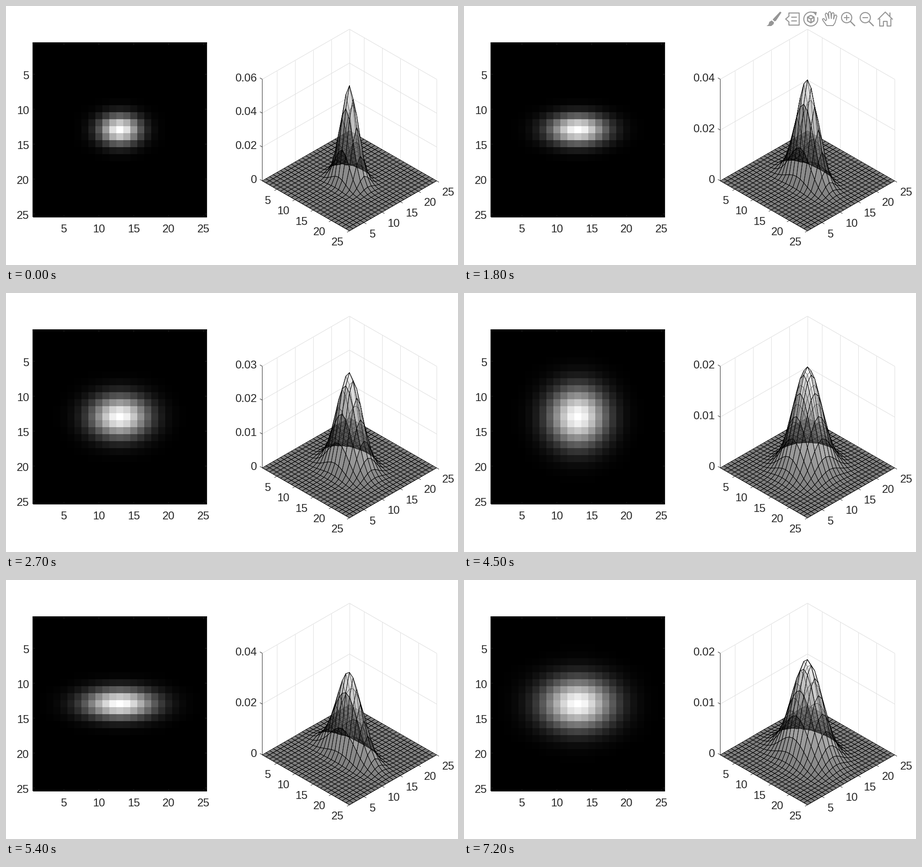
Animation of 971 by 556 pixels, one loop 8 s. Source, as a matplotlib script:

```python
import numpy as np
import matplotlib.pyplot as plt
from matplotlib.animation import FuncAnimation
from matplotlib.collections import LineCollection, PolyCollection
from matplotlib.patches import Arc, Circle, Polygon, Rectangle

W, H, DPI = 971, 556, 64
PT = 72 / DPI                      # points per pixel
INK, ICON = "#262626", "#969696"
N = 25
TICKS = range(5, 26, 5)
FRAME_MS, HOLD = 100, 9            # each plot is held for 9 frames

# Horizontal and vertical variance of each plot
STATES = [(vx, vy) for vx in (4, 8, 12) for vy in range(2, vx + 1, 2)][:9]

# Image panel
LEFT, TOP, CELL = 57.0, 79.0, 14.97
SIDE = N * CELL

# Surface panel
X0, Y0, DX, DY, RISE = 550.5, 375.3, 187.3 / 24, 107.4 / 24, 218.0

fig = plt.figure(figsize=(W / DPI, H / DPI), dpi=DPI, facecolor="white")
ax = fig.add_axes([0, 0, 1, 1])


def label(x, y, text, ha):
    return ax.text(x, y + 8.5, text, ha=ha, va="baseline", color=INK,
                   family="Liberation Sans", fontsize=24 * PT)


def line(points, color=INK, width=1.0, z=5):
    xs, ys = zip(*points)
    return ax.plot(xs, ys, color=color, lw=width * PT, zorder=z,
                   solid_joinstyle="round", solid_capstyle="butt")[0]


def project(a, b, h=0.0):
    """Screen position of column a, row b at height h (0..1)."""
    return (X0 + DX * (a + b - 2), Y0 + DY * (a - b) - RISE * h)


def gaussian(vx, vy):
    d = np.arange(N) - N // 2
    z = np.exp(-d[None, :] ** 2 / (2 * vx) - d[:, None] ** 2 / (2 * vy))
    return z, 1 / (2 * np.pi * np.sqrt(vx * vy))


def z_axis(peak):
    step = 0.02 if peak > 0.03 else 0.01
    top = np.ceil(peak / (step / 2)) * step / 2
    return top, np.arange(0, top + 1e-9, step)


# Image panel
image = ax.imshow(np.zeros((N, N)), cmap="gray", vmin=0, vmax=1,
                  extent=(LEFT, LEFT + SIDE, TOP + SIDE, TOP),
                  interpolation="nearest", aspect="auto", zorder=1)
ax.set(xlim=(0, W), ylim=(H, 0))
ax.axis("off")
ax.set_autoscale_on(False)
ax.add_patch(Rectangle((LEFT + 0.5, TOP + 0.5), SIDE - 0.5, SIDE - 0.5, fill=False,
                       ec=INK, lw=PT, zorder=2))
for t in TICKS:
    p = (t - 0.5) * CELL
    x, y = LEFT + p, TOP + p
    for edge, inward in ((TOP, 4), (TOP + SIDE, -4)):
        line([(x, edge), (x, edge + inward)])
    for edge, inward in ((LEFT, 4), (LEFT + SIDE, -4)):
        line([(edge, y), (edge + inward, y)])
    label(x, 478, t, "center")
    label(50, y + 2.3, t, "right")

# Surface panel: fixed axes
for t in TICKS:
    x, y = project(t, 1)
    line([(x, y), (x - 5, y + 3)])
    label(x - 12, y + 23.3, t, "right")
    x, y = project(N, t)
    line([(x, y), (x + 5, y + 3)])
    label(x + 11.5, y + 23.3, t, "left")
line([project(1, 1, 1), project(1, 1), project(N, 1), project(N, N)], z=2)

walls = [[project(1, t), project(1, t, 1)] for t in TICKS]
walls += [[project(t, N), project(t, N, 1)] for t in TICKS]
grid = LineCollection([], colors="#dedede", linewidths=PT, zorder=1)
z_marks = LineCollection([], colors=INK, linewidths=PT, zorder=5)
surface = PolyCollection([], edgecolors="black", linewidths=0.85 * PT, zorder=4)
for item in (grid, z_marks, surface):
    ax.add_collection(item, autolim=False)
z_labels = [label(539, 0, "", "right") for _ in range(4)]

# Faces from back to front
rows, cols = np.divmod(np.arange((N - 1) ** 2), N - 1)
order = np.argsort(cols - rows, kind="stable")
rows, cols = rows[order], cols[order]


def toolbar():
    parts = []

    def stroke(*points, width=2.2):
        parts.append(line(points, ICON, width))

    def patch(p):
        parts.append(ax.add_patch(p))

    def shape(*points):
        patch(Polygon(points, fc=ICON, ec="none", zorder=5))

    def ring(x, y, r):
        patch(Circle((x, y), r, fill=False, ec=ICON, lw=2.2 * PT, zorder=5))

    # Brush
    shape((679, 12), (682, 14), (670, 32), (667, 33), (663, 29))
    shape((661, 31), (666, 35), (665, 39), (660, 43), (650, 43), (654, 40), (656, 34))
    # Data tip
    stroke((698, 15), (720, 15), (720, 41), (698, 41), (698, 34),
           (691, 28), (698, 22), (698, 14))
    for y in (24, 32):
        stroke((703, y), (715, y))
    # Rotate
    patch(Arc((745, 28), 30, 30, theta1=-15, theta2=295, ec=ICON,
              lw=2.2 * PT, zorder=5))
    shape((749, 12), (758, 13), (756, 21))
    hexagon = [(745 + 8 * np.sin(k * np.pi / 3), 28 - 8 * np.cos(k * np.pi / 3))
               for k in range(7)]
    stroke(*hexagon, width=2.6)
    for k in (1, 3, 5):
        stroke((745, 28), hexagon[k], width=2.6)
    # Hand
    stroke((777, 32), (773, 27), (770, 28), (771, 31), (779, 42), (793, 42),
           (797, 36), (801, 22), (799, 19), (796, 21), (794, 28), (795, 17),
           (793, 14), (790, 16), (789, 27), (788, 14), (786, 12), (783, 14),
           (784, 27), (781, 17), (778, 15), (776, 18), (779, 29), (777, 32), width=2)
    # Zoom in and out
    for x in (822, 862):
        ring(x, 25, 11)
        stroke((x + 8, 33), (x + 18, 43), width=2.6)
        stroke((x - 6, 25), (x + 6, 25))
    stroke((822, 19), (822, 31))
    # Home
    stroke((889, 29), (905, 13), (921, 29))
    stroke((915, 22), (915, 14))
    stroke((893, 27), (893, 43), (901, 43), (901, 33), (909, 33),
           (909, 43), (917, 43), (917, 27))
    return parts


tools = toolbar()


def update(frame):
    k = frame // HOLD
    shade, peak = gaussian(*STATES[k])
    top, ticks = z_axis(peak)
    image.set_data(shade)

    heights = shade * peak / top
    corners = [project(cols + 1 + i, rows + 1 + j, heights[rows + j, cols + i])
               for i, j in ((0, 0), (1, 0), (1, 1), (0, 1))]
    surface.set_verts(np.array(corners).transpose(2, 0, 1))
    tone = shade[rows, cols]
    surface.set_facecolor(np.column_stack([tone, tone, tone, np.full(tone.size, 0.5)]))

    levels = ticks / top
    grid.set_segments(walls + [[project(1, 1, h), project(1, N, h), project(N, N, h)]
                               for h in levels])
    marks = []
    for text in z_labels:
        text.set_text("")
    for text, t, h in zip(z_labels, ticks, levels):
        x, y = project(1, 1, h)
        marks.append([(x, y), (x - 5, y - 3)])
        text.set_text(f"{t:g}")
        text.set_y(y - 4 + 8.5)
    z_marks.set_segments(marks)

    for part in tools:
        part.set_visible(k in (1, 2))
    return []


anim = FuncAnimation(fig, update, frames=80, interval=FRAME_MS, repeat=True,
                     repeat_delay=0, blit=False)
plt.show()
```
